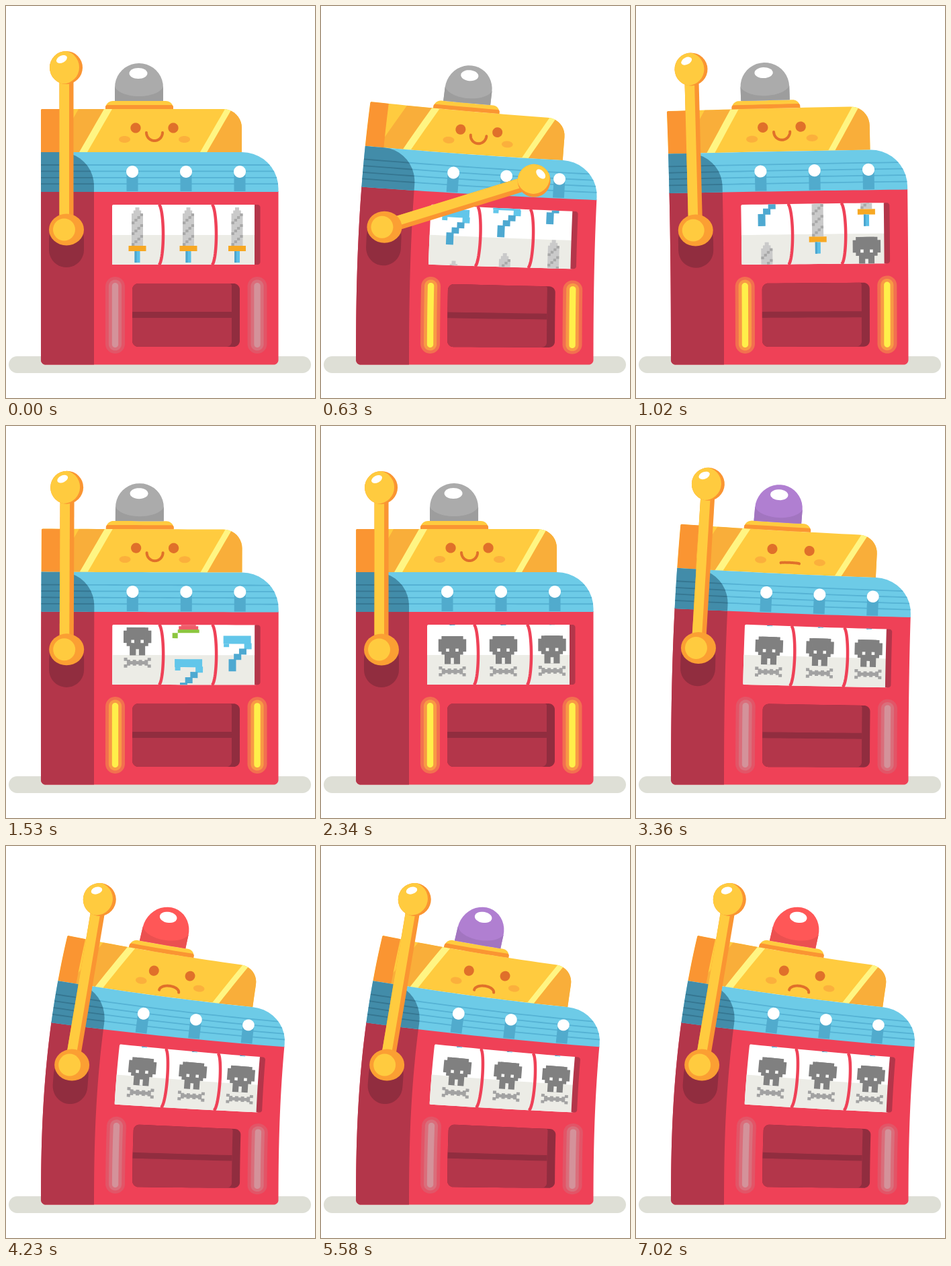
An HTML page with a canvas that plays this animation: 460 by 582 pixels, repeating every 7110 ms.

```html
<!DOCTYPE html>
<html lang="en">
<head>
<meta charset="utf-8">
<title>Slot machine</title>
<style>
  html, body { margin: 0; width: 100%; height: 100%; overflow: hidden; background: #fff; }
  canvas { display: block; width: 460px; height: 582px; }
</style>
</head>
<body>
<canvas id="stage" width="460" height="582"></canvas>
<script>
const ctx = document.getElementById('stage').getContext('2d');
const LOOP = 7110, STEP = 30;
const RED = '#ef4157', SIDE = '#b3364a', DEEP = '#912d3f';
const GOLD = '#ffcb3f', AMBER = '#f9ae3a', ORANGE = '#fa9532', FACE = '#e0702a', PALE = '#fff583';
const GREY = [171, 171, 171], PURPLE = [176, 127, 209], ALARM = [255, 87, 87];
const PITCH = 85;
const REELS = [
  { x: 195.5, from: 360, to: 2150 },
  { x: 271.5, from: 360, to: 2350 },
  { x: 344, from: 420, to: 2370 }
];

let bend = 0;

// ---- Motion ----

function smooth(from, to, t) {
  const u = Math.min(1, Math.max(0, (t - from) / (to - from)));
  return u * u * (3 - 2 * u);
}

// Ease in and out, dipping before the start and past the end.
function easeBack(from, to, t, c = 1.2) {
  const u = Math.min(1, Math.max(0, (t - from) / (to - from)));
  const half = w => w * w * ((c + 1) * w - c) / 2;
  return u < .5 ? half(2 * u) : 1 - half(2 - 2 * u);
}

// Dragged over by the lever, springs back, later slumps for good.
function lean(t) {
  const d = Math.max(0, t - 590);
  const spring = Math.exp(-d / 300) * Math.cos(d / 860 * 2 * Math.PI);
  return .65 * smooth(0, 590, t) * spring + easeBack(2900, 3890, t);
}

const pullAngle = t => 1.4 * smooth(40, 520, t) * (1 - smooth(540, 900, t));

function bulbState(t) {
  if (t < 2940) return GREY;
  const p = (t - 4200) % 1050;
  return t >= 4200 && (p < 300 || p >= 690 && p < 840) ? ALARM : PURPLE;
}

// ---- Shapes on the bending machine ----

// Leans the machine to the right, more so with height above the floor.
function warp([x, y]) {
  const h = Math.max(0, 532 - y), u = x - 165;
  return [
    x + bend * 21.9 * (h / 315) ** 2.4 * (1 - .0014 * u),
    y + bend * .00039 * h * u * (1.12 - .0008 * u)
  ];
}

function trace(pts, closed = true) {
  ctx.beginPath();
  ctx.moveTo(...warp(pts[0]));
  const n = pts.length;
  for (let i = 1; i < n + (closed ? 1 : 0); i++) {
    const a = pts[i - 1], b = pts[i % n];
    const parts = Math.max(1, Math.ceil(Math.hypot(b[0] - a[0], b[1] - a[1]) / 14));
    for (let k = 1; k <= parts; k++) {
      const u = k / parts;
      ctx.lineTo(...warp([a[0] + (b[0] - a[0]) * u, a[1] + (b[1] - a[1]) * u]));
    }
  }
  if (closed) ctx.closePath();
}

function fill(color, pts) {
  trace(pts);
  ctx.fillStyle = color;
  ctx.fill();
}

function stroke(color, width, pts, cap = 'butt') {
  trace(pts, false);
  ctx.strokeStyle = color;
  ctx.lineWidth = width;
  ctx.lineCap = cap;
  ctx.stroke();
}

function clipped(pts, draw) {
  ctx.save();
  trace(pts);
  ctx.clip();
  draw();
  ctx.restore();
}

function arc(x, y, rx, ry, from, to, n = 32) {
  return Array.from({ length: n + 1 }, (_, i) => {
    const p = from + (to - from) * i / n;
    return [x + rx * Math.cos(p), y + ry * Math.sin(p)];
  });
}

const oval = (x, y, rx, ry = rx) => arc(x, y, rx, ry, 0, Math.PI * 2);

// Radii run top left, top right, bottom right, bottom left.
function box(x, y, w, h, r = 0) {
  const [a, b, c, d] = Array.isArray(r) ? r : [r, r, r, r];
  const q = Math.PI / 2;
  const corner = (cx, cy, rad, k) => rad ? arc(cx, cy, rad, rad, k * q, (k + 1) * q, 10) : [[cx, cy]];
  return [
    ...corner(x + a, y + a, a, 2), ...corner(x + w - b, y + b, b, 3),
    ...corner(x + w - c, y + h - c, c, 0), ...corner(x + d, y + h - d, d, 1)
  ];
}

// ---- Reel symbols ----

// Bar centred on x.
const bar = (color, x, y, w, h) => fill(color, box(x - w / 2, y, w, h));

function skull(x, y) {
  const p = 4.6, top = y - 32;
  for (let i = 0; i < 3; i++) {
    const first = i ? 0 : 1, last = 5 + i * i;
    bar('#808080', x, top + first * p, (9 - 2 * i) * p, (last - first) * p);
  }
  for (const s of [-1, 1]) bar('#f6f6f4', x + s * 7, top + 4 * p, p, p);
  bar('#f0f0ec', x, top + 7 * p, p, 2 * p);
  for (let k = -4; k <= 4; k++) {
    const spread = Math.abs(k) === 4 ? 5 : k % 2 ? 2 : 0;
    for (const s of [-1, 1]) bar('#a2a2a2', x + k * 4.4, y + 18 + s * spread, 5, 4.6);
  }
}

function sword(x, y) {
  for (let i = 0; i < 3; i++) bar('#cacaca', x, y - 45 + i * 4.5, 6 + 5.5 * i, 48);
  for (let r = 0; r < 12; r++) {
    bar('#a8a8a8', x + 6.4 - r % 4 * 4.25, y - 36 + r * 4, 4.25, 4);
  }
  bar('#f7a823', x, y + 12, 26, 8);
  bar('#5bbfe6', x, y + 20, 8, 17);
  bar('#4ba5cf', x - 2.5, y + 20, 3, 17);
}

function seven(x, y) {
  bar('#62c6ea', x, y - 37, 41, 12);
  bar('#62c6ea', x - 16, y - 25, 8, 5);
  for (let i = 0; i < 4; i++) {
    bar(i < 1 ? '#62c6ea' : '#4ea9d1', x + 16 - i * 7.7, y - 26 + i * 8, 11, i < 3 ? 9 : 18);
  }
}

function melon(x, y) {
  for (let i = 0; i < 4; i++) bar('#ef5a68', x, y - 22 + i * 7, 8 + 7 * i, 7.5);
  bar('#8cc63f', x, y + 4, 32, 5);
  bar('#8cc63f', x - 20, y + 9, 8, 8);
}

const SYMBOLS = [sword, seven, melon, skull];

function drawReels(t) {
  fill('#fff', box(158, 295, 214, 89, 2));
  fill('#ecece6', box(158, 340, 214, 44));
  const turn = SYMBOLS.length * PITCH;
  clipped(box(158, 295, 212, 89), () => {
    for (const { x, from, to } of REELS) {
      const shift = 15 * PITCH * smooth(from, to, t);
      SYMBOLS.forEach((draw, i) => {
        const y = (shift - i * PITCH + 4.5 * turn) % turn - turn / 2;
        if (Math.abs(y) < 95) draw(x, 344 + y);
      });
    }
  });
  fill(SIDE, box(370, 295, 8.5, 89, [0, 4, 4, 0]));
  for (const x of [227, 306]) {
    stroke(RED, 4.5, arc(x, 339.5, 7, 45, -Math.PI / 2, Math.PI / 2));
  }
}

// ---- Machine ----

function drawBulb(t) {
  const now = bulbState(t), before = bulbState(t - STEP);
  const rgb = f => `rgb(${now.map((c, k) => Math.round((c + before[k]) / 2 * f)).join()})`;
  const dome = box(162, 85, 72, 56, [35.9, 35.9, 0, 0]);
  fill(rgb(1), dome);
  clipped(dome, () => fill(rgb(.92), [...arc(198, 116, 37, 18, Math.PI, 0), [235, 142], [161, 142]]));
  fill('#fff', oval(197, 100, 13.5, 8));
}

function drawFace(t) {
  for (const s of [-1, 1]) {
    fill(FACE, oval(221 + 28 * s, 181, 7.6));
    fill('#fbb03c', oval(221 + 44.5 * s, 198, 8.5, 5));
  }
  const sad = smooth(3090, 3540, t);
  stroke(FACE, 4, arc(221, 188 + 20 * sad, 12 + 3 * sad, 12 - 20 * sad, Math.PI, 0), 'round');
}

function drawTop(t) {
  const shell = box(52, 153, 299, 64, [2, 28, 0, 0]);
  const slant = (color, x, w) => fill(color, [[x, 153], [x + w, 153], [x + w - 37, 217], [x - 37, 217]]);
  fill(GOLD, shell);
  clipped(shell, () => {
    slant(AMBER, 108, 40);
    slant(PALE, 146, 12);
    slant(AMBER, 336, 60);
    slant(PALE, 326, 10);
    fill(ORANGE, box(52, 153, 28, 64));
  });
  fill(GOLD, box(148, 141, 101, 12, [11, 11, 0, 0]));
  fill(ORANGE, box(148, 147, 101, 6, [3, 3, 0, 0]));
  drawBulb(t);
  drawFace(t);
}

function drawBand() {
  const striped = (shape, color, line) => {
    fill(color, shape);
    clipped(shape, () => {
      for (let y = 236; y < 270; y += 9.4) stroke(line, 1.8, [[52, y], [406, y]]);
    });
  };
  striped(box(52, 217, 353.5, 59, [0, 54, 0, 0]), '#6dcbe7', '#55b2d4');
  striped(box(52, 217, 79, 59, [0, 50, 0, 0]), '#428ca9', '#357691');
  for (let x = 188; x < 350; x += 80) {
    bar('#51abcd', x, 246, 17, 29);
    fill('#fff', oval(x, 246, 9));
  }
}

function drawBody(t) {
  fill(RED, box(52, 275, 353.5, 257.5, [0, 0, 7, 7]));
  fill(SIDE, box(52, 275, 79, 257.5, [0, 0, 0, 7]));

  fill(DEEP, box(188, 412, 160, 94, 9));
  fill(SIDE, box(188, 412, 148, 94, [9, 3, 8, 9]));
  fill(DEEP, box(188, 454, 148, 9));

  const on = t >= 390 && t < 2910;
  const glow = on ? ['#f2704f', '#f89a45', '#ffef4a'] : ['#e25567', '#da6e7b', '#d4929a'];
  for (const x of [162.5, 374]) {
    glow.forEach((color, i) => {
      const r = 14.5 - 4.9 * i;
      fill(color, box(x - r, 402 + 4.5 * i, 2 * r, 114 - 9 * i, r - .1));
    });
  }
}

// ---- Lever, which stays rigid ----

function disc(color, x, y, rx, ry = rx, tilt = 0) {
  ctx.beginPath();
  ctx.ellipse(x, y, rx, ry, tilt, 0, Math.PI * 2);
  ctx.fillStyle = color;
  ctx.fill();
}

function rect(color, x, y, w, h, r = 0) {
  ctx.beginPath();
  ctx.roundRect(x, y, w, h, r);
  ctx.fillStyle = color;
  ctx.fill();
}

function drawLever(t) {
  fill(DEEP, box(64, 320, 52, 68, 25.9));
  const pull = pullAngle(t);
  const length = 240.5 + 8.5 * bend - 13 * Math.sin(pull);
  ctx.save();
  ctx.translate(...warp([90, 332]));

  ctx.save();
  ctx.rotate(pull + .168 * bend);
  rect(ORANGE, -10.5, -length, 21, length);
  rect(GOLD, -10.5, -length, 14.5, length);
  ctx.translate(-.5, -length);
  disc(ORANGE, 0, 0, 24.5);
  ctx.save();
  ctx.clip();
  disc(GOLD, -5, -.5, 24.5);
  ctx.restore();
  disc('#fff', -6.5, -12.5, 8.5, 5.2, -.45);
  ctx.restore();

  disc('#fb9f33', 0, 0, 26, 23.5);
  disc(GOLD, -3.5, 0, 16.5);
  ctx.restore();
}

function render(t) {
  bend = lean(t);
  ctx.fillStyle = '#fff';
  ctx.fillRect(0, 0, 460, 582);
  rect('#dedfd6', 4, 520, 450, 25, 12.5);
  drawTop(t);
  drawBody(t);
  drawBand();
  drawReels(t);
  drawLever(t);
}

const begin = performance.now();
function frame() {
  const t = (performance.now() - begin) % LOOP;
  render(Math.floor(t / STEP) * STEP);
  requestAnimationFrame(frame);
}
frame();
</script>
</body>
</html>
```
